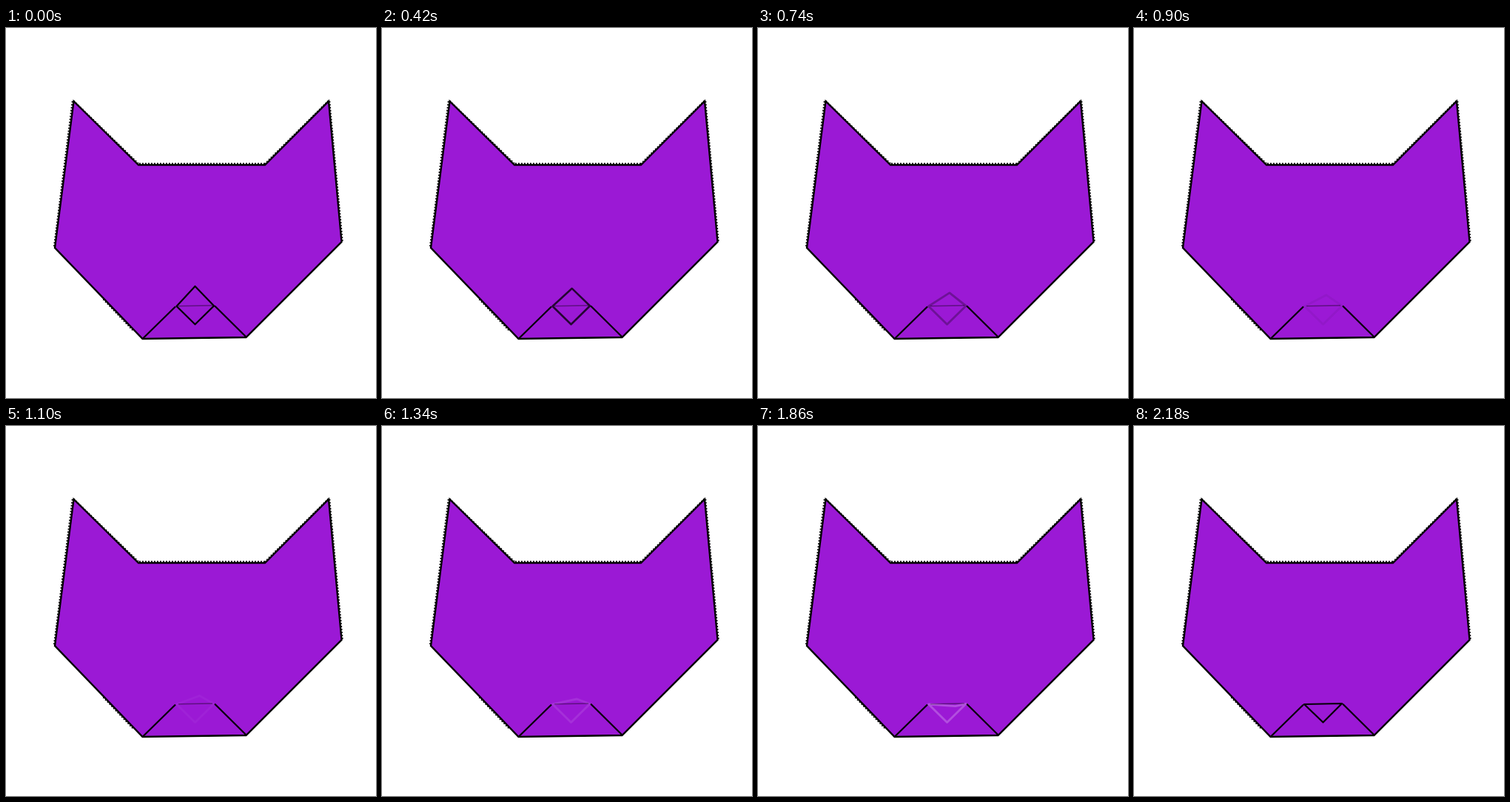
Recreate the animation shown at these times as an HTML page. Size 500 px wide and 500 px high, loop 2460 ms.

```html
<!DOCTYPE html>
<html lang="en">
<head>
<meta charset="utf-8">
<title>Folding paper cat</title>
<style>
  html, body { margin: 0; width: 100%; height: 100%; overflow: hidden; background: #fff; }
  svg { display: block; width: 100%; height: 100%; }
</style>
</head>
<body>
<svg viewBox="0 0 500 500" fill="none" stroke="#000" stroke-width="2.2">
  <!-- rough pen edge -->
  <g stroke-width="4.6" stroke-dasharray="1.8 2.2">
    <path d="M91 99L66 297M180 184.5H350M436 99L453.5 289"/>
    <path d="M91 99L179 184.5M350 184.5L436 99M132 366L172 408" stroke-width="3.6"/>
  </g>
  <path d="M91.5 99L179 185H350L436 99L453.5 289L324.5 418L184.5 420L66 297Z" fill="#9b19d5" stroke-width="2.4"/>
  <path d="M185 419.5L229 376.5M282 375.5L325 418"/>
  <path id="crease" d="M233 375.7L279 375" stroke-width="1.6" stroke-opacity=".4"/>
  <path id="flap" stroke-linejoin="round"/>
</svg>
<script>
  const LOOP = 2460, START = 300, STEP = 40, STEPS = 42, FOLDED = 2180;
  const flap = document.getElementById('flap');
  const crease = document.getElementById('crease');
  const clamp = (v, lo, hi) => Math.min(hi, Math.max(lo, v));

  function render(t) {
    const done = t >= FOLDED;
    const n = clamp(Math.floor((t - START) / STEP) + 1, 0, STEPS);
    const x = 255.5 + n * 0.28, y = 349 + n * 0.74;
    const ink = done ? 1 : 1 - n / 17;
    const dark = ink >= 0;

    flap.setAttribute('d', done
      ? 'M230 376L255.5 400.5L281 375Z'
      : `M230.5 376L${x} ${y}L281 375.5L255.5 400.5Z`);
    flap.setAttribute('stroke', dark ? '#000' : '#fff');
    flap.setAttribute('stroke-opacity', dark ? ink : -ink * 0.17);
    flap.setAttribute('stroke-width', done ? 2.2 : 2.2 + Math.min(n / 9, 1) * 0.7);
    crease.style.display = done ? 'none' : '';
  }

  const origin = performance.now();
  function tick() {
    render((performance.now() - origin) % LOOP);
    requestAnimationFrame(tick);
  }
  tick();
</script>
</body>
</html>
```
